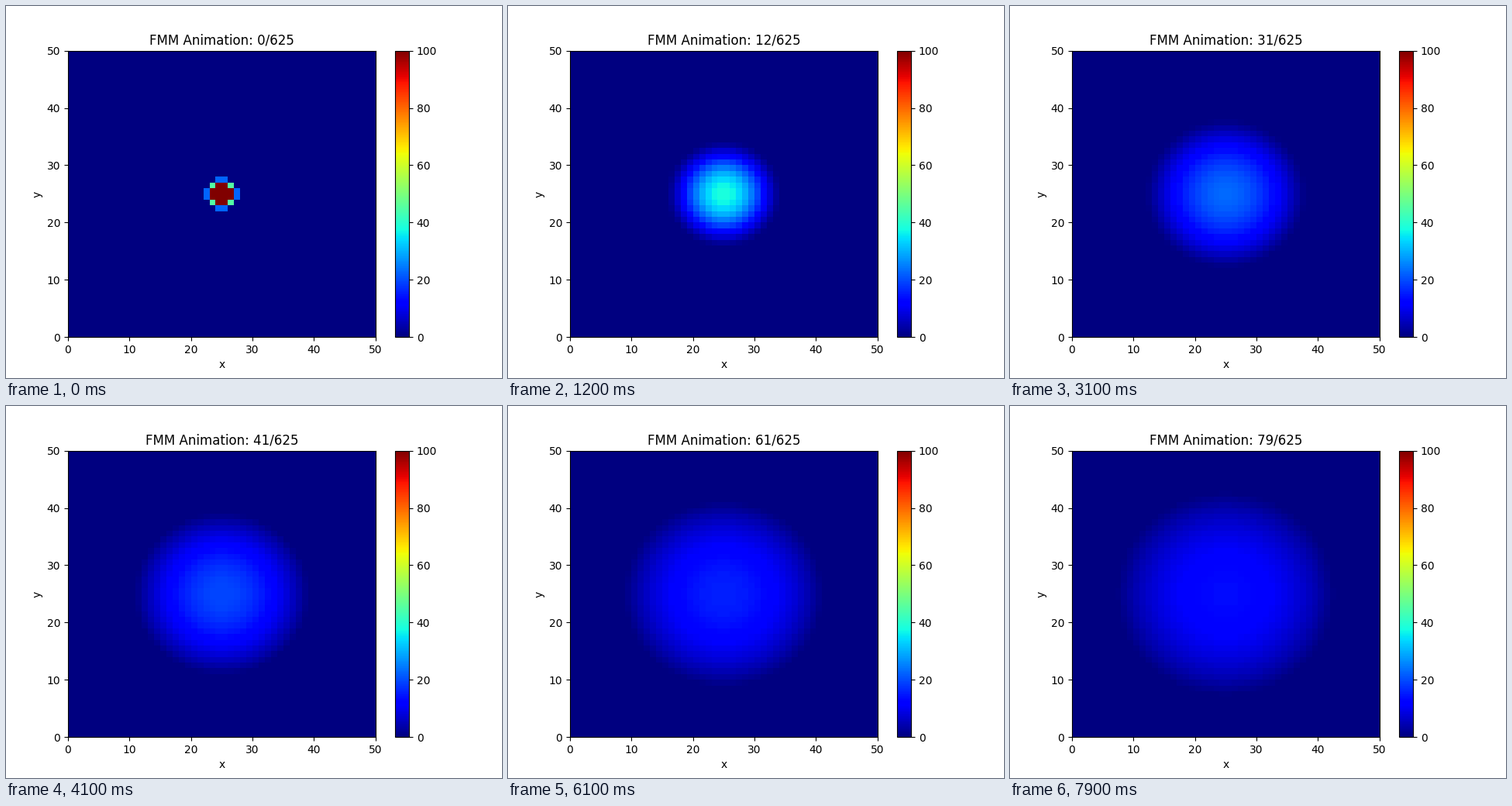
A matplotlib script that plays this animation: 640 by 480 pixels, repeating every 8000 ms.

```python
import numpy as np
import matplotlib.pyplot as plt
from matplotlib.animation import FuncAnimation

SIZE = 50
STEPS = 625
FRAMES = 80
INTERVAL = 100

axis = np.arange(SIZE) + 0.5 - SIZE / 2
X, Y = np.meshgrid(axis, axis)
R2 = X**2 + Y**2


def hot_disc():
    """Hot disc of radius 2 that has just begun to leak into its neighbours."""
    hot = (R2 < 4).astype(float)
    p = np.pad(hot, 1)
    touching = p[:-2, 1:-1] + p[2:, 1:-1] + p[1:-1, :-2] + p[1:-1, 2:]
    return np.where(hot > 0, 100, 22.5 * touching)


def field(n):
    """Spreading blob: the peak falls and the front grows as powers of time."""
    if n == 0:
        return hot_disc()
    peak = 153 * n**-0.555
    front = 4.21 * n**0.33
    sharpness = 1 + 1.3 * np.exp(-n / 20)
    return peak * np.clip(1 - R2 / front**2, 0, None) ** sharpness


fig, ax = plt.subplots(figsize=(6.4, 4.8), dpi=100)
mesh = ax.pcolormesh(field(0), cmap="jet", vmin=0, vmax=100)
fig.colorbar(mesh, ax=ax)
ax.set_xlabel("x")
ax.set_ylabel("y")
title = ax.set_title("")


def update(n):
    mesh.set_array(field(n))
    title.set_text(f"FMM Animation: {n}/{STEPS}")
    return mesh, title


anim = FuncAnimation(fig, update, frames=FRAMES, interval=INTERVAL,
                     repeat=True, repeat_delay=0, blit=False)
plt.show()
```
